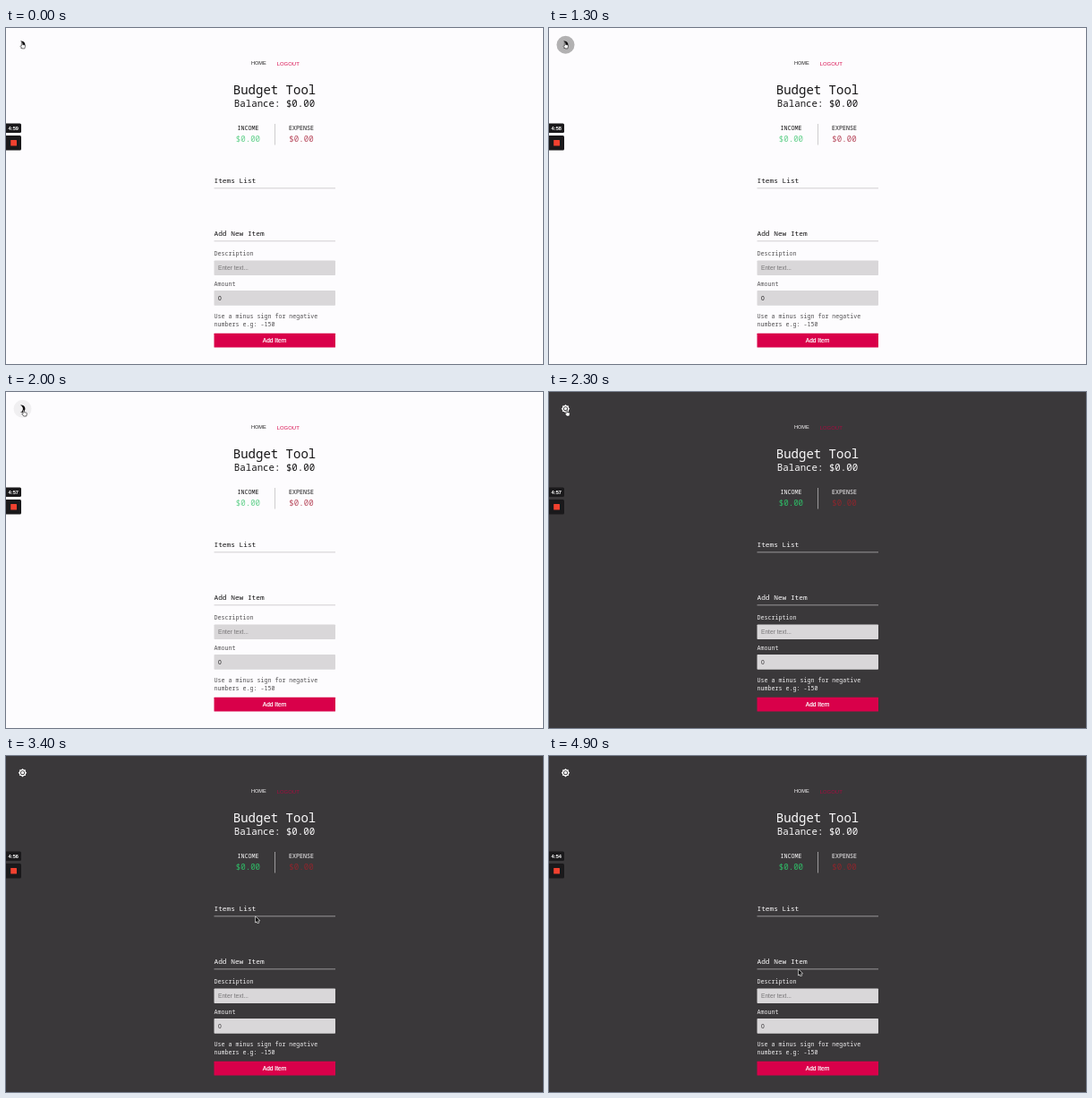
Animation, 600 px wide and 375 px high, one loop 5 s. Source, as an HTML page with a canvas:

```html
<!DOCTYPE html>
<html lang="en">
<head>
<meta charset="utf-8">
<title>Budget Tool</title>
<style>
html, body { margin: 0; width: 100%; height: 100%; overflow: hidden; background: #fdfcfe; }
canvas { display: block; width: 600px; height: 375px; }
</style>
</head>
<body>
<canvas id="stage"></canvas>
<script>
const W = 600, H = 375, LOOP = 5000, STEP = 100;
const DARK_AT = 2300;
const MONO = '"Noto Sans Mono", "DejaVu Sans Mono", monospace';
const SANS = '"Liberation Sans", Arial, sans-serif';
const ICON = { x: 18.5, y: 18.7, scale: 10 / 24 };

const LIGHT = {
  bg: '#fdfcfe', text: '#161516', soft: '#525052', line: '#c2c0c2',
  home: '#232223', logout: '#d80a4c', income: '#62d08b', expense: '#b84b5e', value: '#1c1b1c'
};
const DARK = {
  bg: '#3a383a', text: '#fbfafb', soft: '#efeeef', line: '#b5b3b5',
  home: '#fbfafb', logout: '#a80b40', income: '#2fbd67', expense: '#8c262d', value: '#333133'
};

const canvas = document.getElementById('stage');
const ctx = canvas.getContext('2d');
const dpr = window.devicePixelRatio || 1;
canvas.width = W * dpr;
canvas.height = H * dpr;

const clamp = v => Math.max(0, Math.min(1, v));
const span = (t, a, b) => clamp((t - a) / (b - a));
const ease = p => p * p * (3 - 2 * p);
const mix = (a, b, p) => a + (b - a) * p;

function text(str, x, y, size, color, font = MONO, align = 'left', weight = 400) {
  ctx.font = `${weight} ${size}px ${font}`;
  ctx.textAlign = align;
  ctx.fillStyle = color;
  ctx.fillText(str, x, y);
}

function box(x, y, w, h, color, r = 0) {
  ctx.fillStyle = color;
  ctx.beginPath();
  ctx.roundRect(x, y, w, h, r);
  ctx.fill();
}

function disc(x, y, r, color) {
  ctx.fillStyle = color;
  ctx.beginPath();
  ctx.arc(x, y, r, 0, Math.PI * 2);
  ctx.fill();
}

function page(c) {
  box(0, 0, W, H, c.bg);
  text('HOME', 274, 41.3, 5.55, c.home, SANS);
  text('LOGOUT', 302.7, 41.5, 5.95, c.logout, SANS);

  text('Budget Tool', 300, 73.7, 14, c.text, MONO, 'center');
  text('Balance: $0.00', 300, 87.8, 10.75, c.text, MONO, 'center');
  text('INCOME', 270.4, 114.2, 6.67, c.text, MONO, 'center');
  text('EXPENSE', 330, 114.2, 6.67, c.text, MONO, 'center');
  text('$0.00', 270.4, 127, 9.1, c.income, MONO, 'center');
  text('$0.00', 330, 127, 9.1, c.expense, MONO, 'center');
  box(300, 107, 0.8, 23.5, c.line);

  text('Items List', 232.5, 172.5, 7.8, c.text);
  box(232.5, 178.5, 135.5, 0.8, c.line);
  text('Add New Item', 232.5, 231.7, 7.8, c.text);
  box(232.5, 237.5, 135.5, 0.8, c.line);

  text('Description', 232.5, 253.8, 6.67, c.soft);
  box(232.5, 259.5, 135.5, 16.5, '#d9d7d9', 0.8);
  text('Enter text...', 237, 270.1, 6.65, '#777577', SANS);
  text('Amount', 232.5, 287.5, 6.67, c.soft);
  box(232.5, 293, 135.5, 16.7, '#d9d7d9', 0.8);
  text('0', 237, 303.8, 6.65, c.value, SANS);
  text('Use a minus sign for negative', 232.5, 323.8, 6.67, c.soft);
  text('numbers e.g: -150', 232.5, 332.5, 6.67, c.soft);

  box(232.5, 340.7, 135.5, 15.8, '#d9004a', 0.5);
  text('Add Item', 300, 351, 6.65, '#fff', SANS, 'center');
  ctx.strokeStyle = '#fff';
  ctx.lineWidth = 0.2;
  ctx.strokeText('Add Item', 300, 351);
}

function moon() {
  const a = Math.atan2(9.54, -3), b = Math.atan2(9.54, 3);
  ctx.fillStyle = '#0c0b0c';
  ctx.beginPath();
  ctx.arc(-3, 0, 10, -a, a);
  ctx.arc(-9, 0, 10, b, -b, true);
  ctx.fill();
}

function sun(bg) {
  for (const turn of [0, Math.PI / 4]) {
    ctx.save();
    ctx.rotate(turn);
    box(-8, -8, 16, 16, '#fff');
    ctx.restore();
  }
  disc(0, 0, 6, bg);
  disc(0, 0, 4, '#fff');
}

function toggle(t, dark, c) {
  if (!dark) {
    const hover = 0.05 * span(t, 0, 400);
    disc(ICON.x, ICON.y, 10, `rgba(0,0,0,${hover})`);
    const grow = ease(span(t, 500, 1050));
    const fade = 1 - ease(span(t, 1300, 1850));
    if (grow > 0 && fade > 0) {
      const alpha = mix(0.1, 0.26, grow) * fade;
      disc(ICON.x, ICON.y, 10 * grow, `rgba(0,0,0,${alpha})`);
    }
  }
  ctx.save();
  ctx.translate(ICON.x, ICON.y);
  ctx.scale(ICON.scale, ICON.scale);
  dark ? sun(c.bg) : moon();
  ctx.restore();
}

function recorder(t) {
  const left = 59 - Math.floor((t + 100) / 1000);
  box(0, 106.5, 17, 10.5, '#1a191b', [0, 1.5, 1.5, 0]);
  text('4:' + left, 8.3, 113.7, 5.7, '#fff', SANS, 'center', 700);
  box(0, 120, 17, 16.5, '#1a191b', [0, 1.5, 1.5, 0]);
  box(5.2, 125, 6.8, 6.5, '#f2412f', 0.5);
}

const ARROW = new Path2D('M0 0V6.3L1.5 4.9L2.5 7.2L3.6 6.7L2.6 4.5H4.6Z');
const HAND = new Path2D('M-.6 0Q0-.6.6 0V2.3L2.9 2.8Q3.7 3 3.6 3.9L3 6.7H.1L-1.8 4.2Q-1.6 3.3-.6 3.9Z');
const BEAM = new Path2D('M-1.5-3.6Q0-3.6 0-2.8Q0-3.6 1.5-3.6M0-2.8V2.8M-1.5 3.6Q0 3.6 0 2.8Q0 3.6 1.5 3.6');

// Pointer stops: start and end of each move, and where it lands.
const MOVES = [
  [0, 0, 17.9, 16.2],
  [1800, 2000, 19.7, 20.3],
  [2800, 3400, 278.7, 179.3],
  [3600, 3900, 264.6, 171.8],
  [4700, 4900, 278.6, 238.3]
];

function pointerAt(t) {
  let x = MOVES[0][2], y = MOVES[0][3];
  for (const [a, b, toX, toY] of MOVES.slice(1)) {
    const p = ease(span(t, a, b));
    x = mix(x, toX, p);
    y = mix(y, toY, p);
  }
  return { x, y };
}

function pointer(t) {
  const { x, y } = pointerAt(t);
  const overIcon = Math.hypot(x - ICON.x, y - ICON.y) < 10;
  const overText = x > 232 && x < 280 && y > 163 && y < 176;
  ctx.save();
  ctx.translate(x, y);
  ctx.lineJoin = 'round';
  if (overText) {
    ctx.strokeStyle = '#222';
    ctx.lineWidth = 1.5;
    ctx.stroke(BEAM);
    ctx.strokeStyle = '#f4f3f4';
    ctx.lineWidth = 0.8;
    ctx.stroke(BEAM);
  } else if (overIcon) {
    ctx.fillStyle = '#fff';
    ctx.strokeStyle = '#151415';
    ctx.lineWidth = 0.6;
    ctx.fill(HAND);
    ctx.stroke(HAND);
  } else {
    ctx.strokeStyle = '#fff';
    ctx.lineWidth = 1.1;
    ctx.stroke(ARROW);
    ctx.fillStyle = '#111';
    ctx.fill(ARROW);
  }
  ctx.restore();
}

function draw(now) {
  const t = Math.floor((now % LOOP) / STEP) * STEP;
  const dark = t >= DARK_AT;
  const colors = dark ? DARK : LIGHT;
  ctx.setTransform(dpr, 0, 0, dpr, 0, 0);
  page(colors);
  toggle(t, dark, colors);
  recorder(t);
  pointer(t);
}

const start = performance.now();
function tick() {
  draw(performance.now() - start);
  requestAnimationFrame(tick);
}
tick();
</script>
</body>
</html>
```
